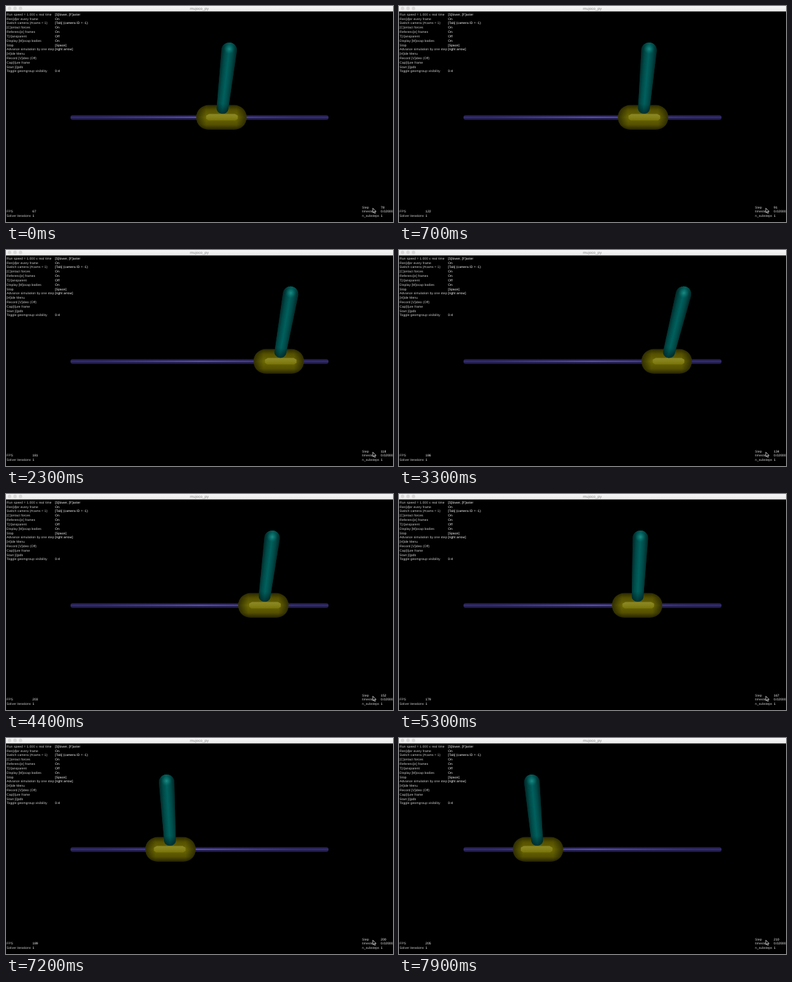
Animation of 600x337 px, one loop 8000 ms. Source, as an HTML page:

```html
<!DOCTYPE html>
<html lang="en">
<head>
<meta charset="utf-8">
<title>mujoco_py</title>
<style>
  html, body { margin: 0; height: 100%; overflow: hidden; background: #000; }
  svg { display: block; width: 100%; height: 100%; }
  text {
    font: 5px "Liberation Sans", Arial, sans-serif;
    letter-spacing: .1px;
    text-rendering: geometricPrecision;
    fill: #fff;
    white-space: pre;
  }
  .label { fill: #d0d0d0; }
  .title { font-size: 6px; letter-spacing: 0; fill: #8a8a8a; text-anchor: middle; }
</style>
</head>
<body>
<svg viewBox="0 0 600 337">
  <defs>
    <linearGradient id="bar" x2="0" y2="1">
      <stop stop-color="#f6f6f6"/><stop offset="1" stop-color="#e9e9e9"/>
    </linearGradient>
    <linearGradient id="railBody" x2="0" y2="1">
      <stop stop-color="#15122f"/><stop offset=".45" stop-color="#352e74"/><stop offset="1" stop-color="#15122f"/>
    </linearGradient>
    <linearGradient id="railShine">
      <stop offset=".1" stop-color="#5f57ac" stop-opacity="0"/>
      <stop offset=".5" stop-color="#655db4"/>
      <stop offset=".9" stop-color="#5f57ac" stop-opacity="0"/>
    </linearGradient>
    <linearGradient id="cartBody" x2="0" y2="1">
      <stop stop-color="#2b2900"/><stop offset=".2" stop-color="#545000"/>
      <stop offset=".5" stop-color="#6c6803"/>
      <stop offset=".8" stop-color="#545000"/><stop offset="1" stop-color="#242200"/>
    </linearGradient>
    <linearGradient id="cartEnds">
      <stop stop-opacity=".55"/><stop offset=".2" stop-opacity="0"/>
      <stop offset=".8" stop-opacity="0"/><stop offset="1" stop-opacity=".55"/>
    </linearGradient>
    <linearGradient id="cartShine" x2="0" y2="1">
      <stop stop-color="#8c8826"/><stop offset=".5" stop-color="#858119"/>
      <stop offset="1" stop-color="#787408"/>
    </linearGradient>
    <linearGradient id="poleBody">
      <stop stop-color="#002625"/><stop offset=".25" stop-color="#004a48"/>
      <stop offset=".5" stop-color="#00605d"/>
      <stop offset=".75" stop-color="#004a48"/><stop offset="1" stop-color="#002625"/>
    </linearGradient>
    <linearGradient id="poleFoot" x2="0" y2="1">
      <stop offset=".86" stop-opacity="0"/><stop offset="1" stop-opacity=".45"/>
    </linearGradient>
    <radialGradient id="tipShine">
      <stop stop-color="#1c8b85"/><stop offset="1" stop-color="#0b716c" stop-opacity="0"/>
    </radialGradient>
    <filter id="soft"><feGaussianBlur stdDeviation=".7"/></filter>
  </defs>

  <rect width="600" height="337"/>
  <rect width="600" height="8.5" fill="url(#bar)"/>
  <g fill="#d9d7d7">
    <circle cx="5.5" cy="3.8" r="2.7"/><circle cx="14" cy="3.8" r="2.7"/><circle cx="22.5" cy="3.8" r="2.7"/>
  </g>
  <text class="title" x="299.8" y="5.8">mujoco_py</text>

  <rect x="100" y="170" width="400" height="8" rx="4" fill="url(#railBody)"/>
  <rect x="100" y="172.8" width="400" height="1.6" fill="url(#railShine)"/>

  <g id="cart">
    <rect x="-39" y="-19.5" width="78" height="38.5" rx="19.2" fill="url(#cartBody)"/>
    <rect x="-39" y="-19.5" width="78" height="38.5" rx="19.2" fill="url(#cartEnds)"/>
    <path id="shine" d="M-20-5.5H20L24.5-3V2L21 4.5H-21L-24.5 2V-3Z" fill="url(#cartShine)" filter="url(#soft)"/>
    <g id="pole">
      <path id="rod" d="M-12-105A12 12 0 0 1 12-105L9-14A9 8 0 0 1-9-14Z" fill="url(#poleBody)"/>
      <use href="#rod" style="fill:url(#poleFoot)"/>
      <path d="M-12-105A12 12 0 0 1 12-105L9-14A9 8 0 0 1-9-14Z" fill="url(#poleFoot)"/>
      <circle cy="-107" r="8" fill="url(#tipShine)"/>
    </g>
  </g>

  <g id="overlay"></g>
  <path d="M568.8 315.4V322.4L570.4 321L571.6 323.5L572.8 322.9L571.6 320.5H573.8Z" fill="#000" stroke="#fff" stroke-width=".7"/>
</svg>

<script>
const $ = id => document.getElementById(id);

function addText(x, y, str, cls = "") {
  const el = document.createElementNS("http://www.w3.org/2000/svg", "text");
  el.setAttribute("x", x);
  el.setAttribute("y", y);
  el.setAttribute("class", cls);
  el.textContent = str;
  $("overlay").append(el);
  return el;
}

// Writes label/value rows and returns the value elements.
const addRows = (x, valueX, y, rows) => rows.map(([label, value = ""], i) => {
  addText(x, y + i * 6.82, label, "label");
  return addText(valueX, y + i * 6.82, value);
});

addRows(1, 76, 14.8, [
  ["Run speed = 1.000 x real time", "[S]lower, [F]aster"],
  ["Ren[d]er every frame", "On"],
  ["Switch camera (#cams = 1)", "[Tab] (camera ID = -1)"],
  ["[C]ontact forces", "On"],
  ["Referenc[e] frames", "On"],
  ["T[r]ansparent", "Off"],
  ["Display [M]ocap bodies", "On"],
  ["Stop", "[Space]"],
  ["Advance simulation by one step", "[right arrow]"],
  ["[H]ide Menu"],
  ["Record [V]ideo (Off)"],
  ["Cap[t]ure frame"],
  ["Start [i]pdb"],
  ["Toggle geomgroup visibility", "0-4"]
]);
const [fpsText] = addRows(1, 41, 322.4, [["FPS"], ["Solver iterations", "1"]]);
const [stepText] = addRows(552, 581, 315.6, [["Step"], ["timestep", "0.02000"], ["n_substeps", "1"]]);

const times = [0, 1.4, 3.3, 4.4, 6.2, 7.2, 7.9];
const cartX = [334, 411, 415, 399, 324, 255, 215.5];
const lean = [12, 9, 26, 13.5, -1.5, -6, -9.5];
const steps = [78, 104, 134, 152, 182, 200, 210];
const fps = [67, 176, 186, 203, 154, 189, 205];

const span = i => times[i + 1] - times[i];
const slope = (v, i) => (v[i + 1] - v[i]) / span(i);

function tangent(v, i) {
  const last = times.length - 1;
  if (i === 0) return 1.5 * slope(v, 0) - .5 * tangent(v, 1);
  if (i === last) return 1.5 * slope(v, i - 1) - .5 * tangent(v, i - 1);
  return (slope(v, i - 1) * span(i) + slope(v, i) * span(i - 1)) / (span(i - 1) + span(i));
}

function segment(t) {
  let i = 0;
  while (i < times.length - 2 && t >= times[i + 1]) i++;
  return [i, (t - times[i]) / span(i)];
}

function linear(v, t) {
  const [i, u] = segment(t);
  return Math.round(v[i] + (v[i + 1] - v[i]) * u);
}

function smooth(v, t) {
  const [i, u] = segment(t), h = span(i), w = 1 - u;
  return v[i] * (1 + 2 * u) * w * w + h * tangent(v, i) * u * w * w
    + v[i + 1] * u * u * (3 - 2 * u) - h * tangent(v, i + 1) * u * u * w;
}

function draw(t) {
  const x = smooth(cartX, t), angle = Math.atan(smooth(lean, t) / 105);
  $("cart").setAttribute("transform", `translate(${x} 174)`);
  $("shine").setAttribute("transform", `translate(${(x - 300) * .025})`);
  $("pole").setAttribute("transform", `rotate(${angle * 180 / Math.PI}) scale(1 ${1 / Math.cos(angle)})`);
  stepText.textContent = linear(steps, t);
  fpsText.textContent = linear(fps, t);
}

const start = performance.now();
function tick() {
  const ms = (performance.now() - start) % 8000;
  draw(Math.floor(ms / 100) / 10);
  requestAnimationFrame(tick);
}
tick();
</script>
</body>
</html>
```
